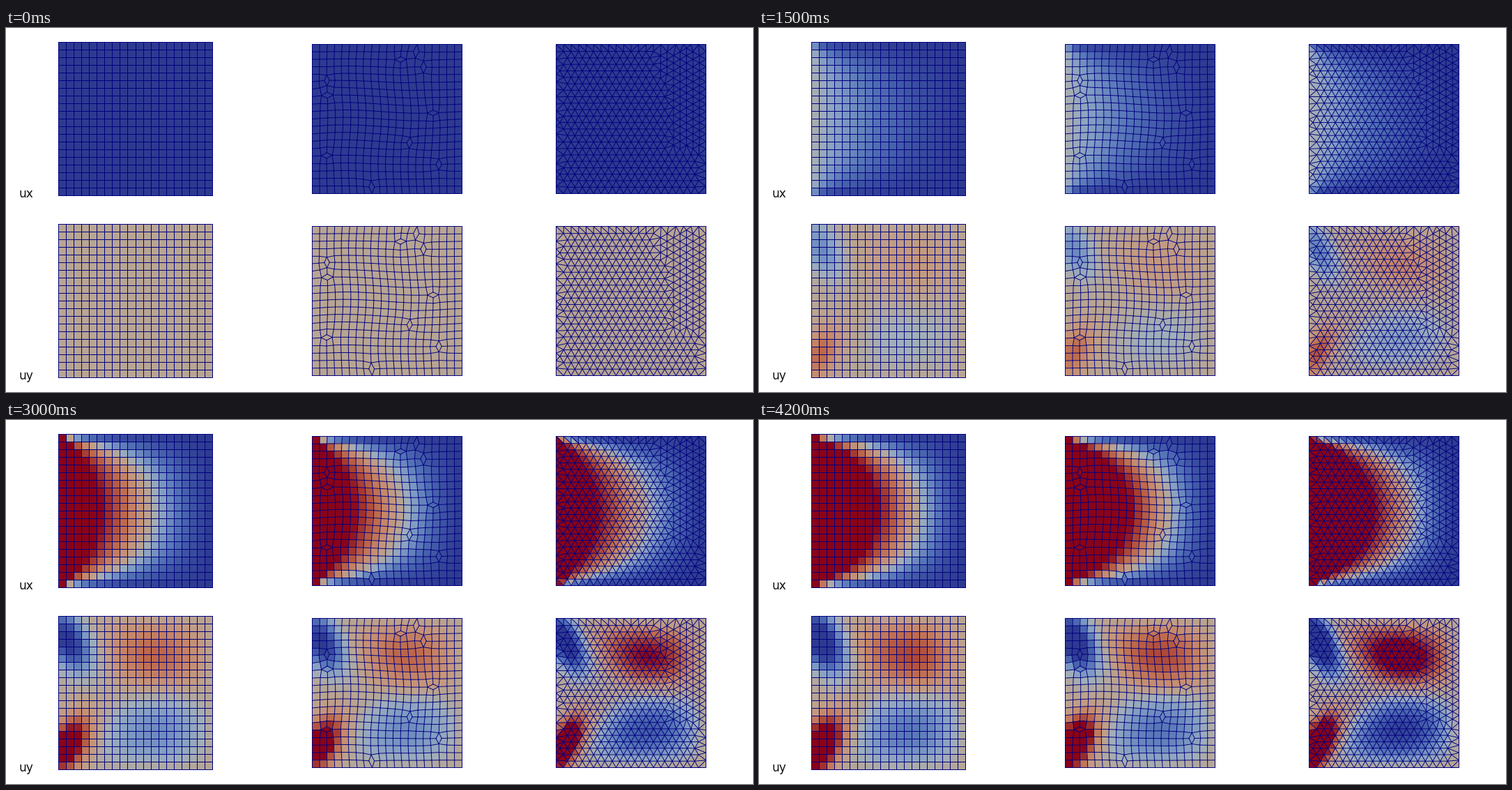
A matplotlib script that plays this animation: 1072x522 px, repeating every 4500 ms.

```python
import numpy as np
import matplotlib.pyplot as plt
from matplotlib.animation import FuncAnimation
from matplotlib.collections import LineCollection, PolyCollection
from matplotlib.colors import LinearSegmentedColormap
from matplotlib.tri import Triangulation

W, H, DPI = 1072, 522, 100
PX = 72 / DPI
N = 20
LOADS = [0, 0, 1, 2, 3, 4]  # the unloaded state is held for two steps
EDGE = "#00007f"

CMAP = LinearSegmentedColormap.from_list("coolwarm_flat", [
    (0.00, "#2e3a90"), (0.12, "#3c50a2"), (0.25, "#5372b6"),
    (0.37, "#7f9bc4"), (0.45, "#a0afba"), (0.51, "#b8a592"),
    (0.58, "#c39a80"), (0.66, "#c6886a"), (0.76, "#bd674a"),
    (0.86, "#ab4334"), (0.95, "#951d24"), (1.00, "#8a0319")])


def grid_mesh():
    """Regular N x N quads in the unit square."""
    s = np.linspace(0, 1, N + 1)
    pts = np.array([(x, y) for y in s for x in s])
    cells = [(k, k + 1, k + N + 2, k + N + 1)
             for j in range(N) for k in range(j * (N + 1), j * (N + 1) + N)]
    return pts, np.array(cells)


def free_mesh():
    """Wavy quad mesh in which some nodes are opened into diamonds."""
    j, i = np.mgrid[0:N + 1, 0:N + 1]
    u, v = i / N, j / N
    inside = (i % N > 0) & (j % N > 0)
    dx = -0.018 * np.sin(np.pi * u) * np.sin(3.1 * np.pi * v) * inside
    dy = -0.014 * np.sin(np.pi * v) * np.sin(2 * np.pi * u + 0.3) * inside
    pts = list(np.stack([u + dx, v + dy], -1).reshape(-1, 2))

    def node(a, b):
        return b * (N + 1) + a

    # column, row, axis along which the node is pulled apart
    opened = [(2, 5, 0), (2, 7, 1), (2, 15, 1), (13, 13, 0), (8, 19, 0),
              (16, 9, 1), (17, 16, 0), (12, 2, 1), (15, 3, 0), (14, 1, 0)]
    twin, quads = {}, []
    for a, b, axis in opened:
        k = node(a, b)
        step = np.array([1 - axis, axis])
        twin[k] = (len(pts), axis)
        pts.append(pts[k] + 0.02 * step)
        pts[k] = pts[k] - 0.02 * step
        before, after = node(a - axis, b - 1 + axis), node(a + axis, b + 1 - axis)
        quads.append((before, twin[k][0], after, k))

    for b in range(N):
        for a in range(N):
            quad = []
            for p, q in ((0, 0), (1, 0), (1, 1), (0, 1)):
                k = node(a + p, b + q)
                # a cell beyond an opened node takes the shifted copy
                if k in twin and (p, q)[twin[k][1]] == 0:
                    k = twin[k][0]
                quad.append(k)
            quads.append(tuple(quad))

    pts = np.array(pts)
    links = [set() for _ in pts]
    for quad in quads:
        for m in range(4):
            links[quad[m]].update((quad[m - 1], quad[(m + 1) % 4]))
    inner = np.flatnonzero(np.all((pts > 1e-6) & (pts < 1 - 1e-6), axis=1))
    for _ in range(12):
        new = pts.copy()
        for k in inner:
            new[k] = 0.4 * pts[k] + 0.6 * pts[list(links[k])].mean(axis=0)
        pts = new
    return pts, np.array(quads)


def tri_mesh():
    """Two equilateral lattices, turned by 90 degrees, joined by Delaunay."""
    h = 1 / N
    r = h * np.sqrt(3) / 2
    pts = [(k * h, e) for k in range(N + 1) for e in (0.0, 1.0)]
    pts += [(e, k * h) for k in range(1, N) for e in (0.0, 1.0)]

    def turned(x, y):
        return y < 0.71 and x > (0.69 if y < 0.23 else 0.775)

    def add(x, y):
        if not (0.025 <= x <= 0.975 and 0.025 <= y <= 0.975):
            return
        if min(np.hypot(x - a, y - b) for a, b in pts) > 0.64 * h:
            pts.append((x, y))

    lattice = [(1 - k * r, (m + 0.5 * (k % 2)) * h)
               for k in range(1, 24) for m in range(N + 1)]
    for x, y in lattice:
        if turned(x, y):
            add(x, y)
    for y, x in lattice:
        if not turned(x, y):
            add(x, y)

    pts = np.array(pts)
    # bulged sides and a slight jitter keep the triangulation well defined
    c = pts - 0.5
    bulge = 1 + 0.02 * (0.25 - c[:, ::-1] ** 2)
    jitter = np.random.default_rng(3).normal(0, 2e-5, pts.shape)
    x, y = (c * bulge + jitter).T
    return pts, Triangulation(x, y).triangles


def ux_shape(x, v):
    s = np.sinh(np.pi * np.maximum(x, 1e-3))
    k = 1.8 + 3.2 * x
    across = np.arctan(k * np.sin(np.pi * v) / s) / np.arctan(k / s)
    return 0.48 * (1 - x) ** 1.15 * across


def uy_shape(x, v, fine):
    w = np.abs(2 * v - 1)
    top = v < 0.5
    if fine:
        x0, sx, cross = 0.19 - 0.19 * w, 0.09, 0.36 - 0.27 * w
        amp_in = np.where(top, -0.23, 0.31)
        amp_out = np.where(top, 0.16, -0.115)
        power = 1.25
    else:
        x0, sx, cross = 0.17 - 0.16 * w, 0.11, 0.33 - 0.14 * w
        amp_in = np.where(top, -0.19, 0.25)
        amp_out = np.where(top, 0.085, -0.062)
        power = 1.0
    near = np.exp(-((x - x0) / sx) ** 2 - ((w - 0.68) / 0.33) ** 2)
    xi = np.clip((x - cross) / (1 - cross), 0, 1)
    far = np.clip(np.sin(np.pi * xi) * np.sin(np.pi * w), 0, 1) ** power
    return amp_in * near + amp_out * far


def edges(cells):
    """Each side of the cells once, as pairs of node numbers."""
    pairs = np.stack([cells, np.roll(cells, -1, axis=1)], -1).reshape(-1, 2)
    return np.unique(np.sort(pairs, axis=1), axis=0)


fig = plt.figure(figsize=(W / DPI, H / DPI), dpi=DPI, facecolor="white")
ax = fig.add_axes([0, 0, 1, 1])
ax.set_xlim(0, W)
ax.set_ylim(H, 0)
ax.axis("off")

for label, y in (("ux", 243), ("uy", 504)):
    ax.text(18, y, label, family="DejaVu Sans", fontsize=17 * PX,
            color="#111111", va="baseline")

# mesh, left, top, width, height, whole pixels, fine
PANELS = [(grid_mesh(), 75, 20, 221, 220, True, False),
          (free_mesh(), 439, 23, 215, 214, False, False),
          (tri_mesh(), 789, 23, 215, 214, False, True)]

layers = []
for (pts, cells), left, top, wide, high, whole, fine in PANELS:
    x, v = np.clip(pts[cells].mean(axis=1).T, 0, 1)
    fields = ((0, 0.0, ux_shape(x, v)), (261, 0.51, uy_shape(x, v, fine)))
    for drop, base, shape in fields:
        xy = pts * (wide, high) + (left, top + drop)
        if whole:
            xy = np.round(xy)
        xy = xy + 0.5
        fill = PolyCollection(xy[cells], cmap=CMAP, edgecolors="none",
                              linewidths=0, antialiaseds=False, snap=False)
        fill.set_clim(0, 1)
        ax.add_collection(fill, autolim=False)
        lines = LineCollection(xy[edges(cells)], colors=EDGE,
                               linewidths=(1 if whole else 0.95) * PX,
                               capstyle="projecting", snap=False)
        ax.add_collection(lines, autolim=False)
        layers.append((fill, base, shape))


def draw(step):
    for fill, base, shape in layers:
        fill.set_array(np.clip(base + LOADS[step] * shape, 0, 1))
    return [layer[0] for layer in layers]


anim = FuncAnimation(fig, draw, frames=len(LOADS), interval=750,
                     repeat=True, repeat_delay=0, blit=False)
plt.show()
```
